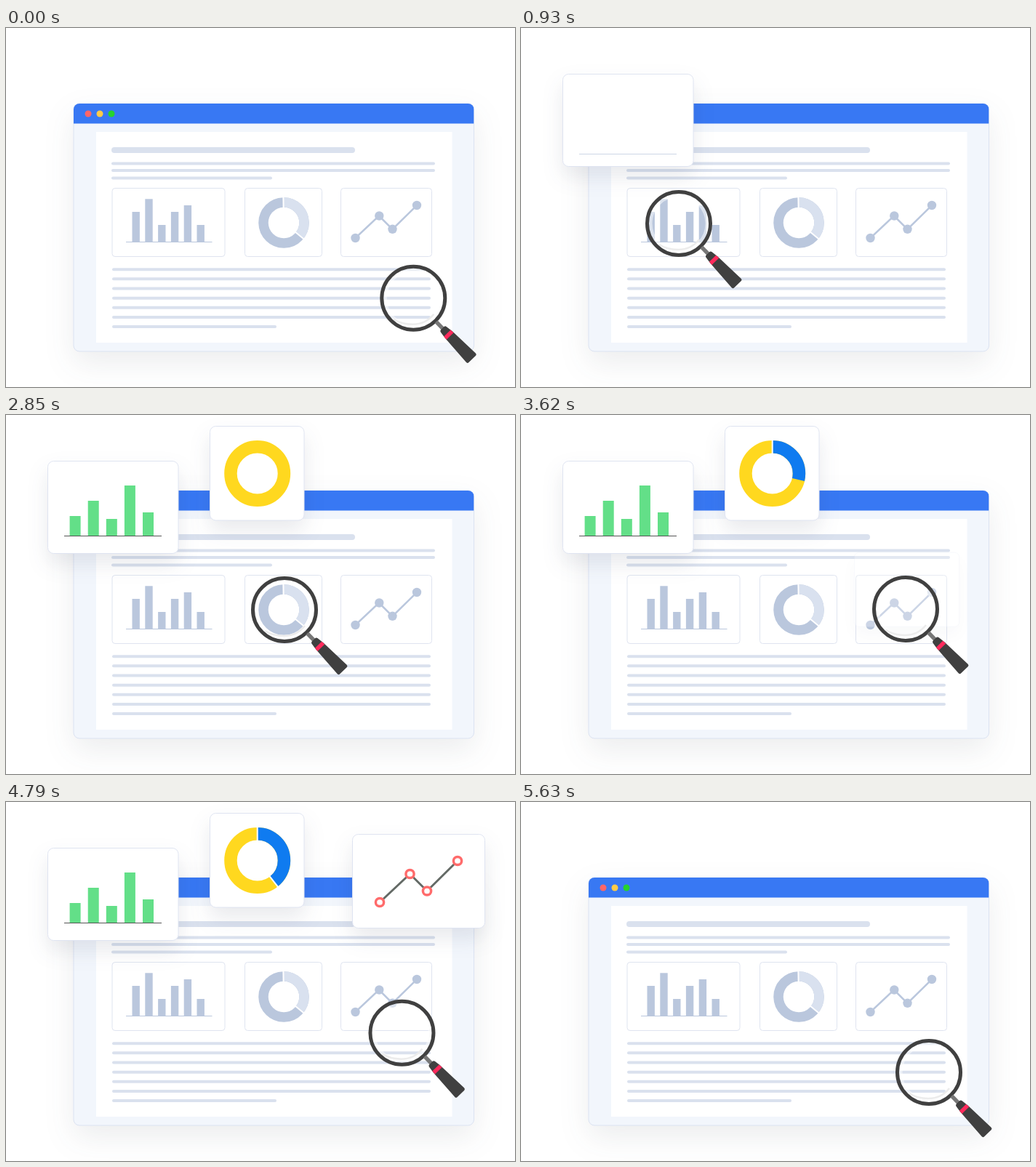
An HTML page that plays this animation: 700 by 494 pixels, repeating every 6.53 s.

```html
<!DOCTYPE html>
<html lang="en">
<head>
<meta charset="utf-8">
<title>Report analysis</title>
<style>
  html, body { margin: 0; width: 100%; height: 100%; overflow: hidden; background: #fff; }
  svg { display: block; width: 700px; height: 494px; }
  .window { filter: drop-shadow(0 16px 20px rgba(40, 50, 70, .09)); }
  .card > rect:first-child { fill: #fff; stroke: #dfe4f1; filter: drop-shadow(0 14px 14px rgba(40, 50, 80, .1)); }
  .panel { fill: #fff; stroke: #dfe4f0; }
  .text { stroke: #dae1ee; stroke-width: 4; stroke-linecap: round; }
</style>
</head>
<body>
<svg viewBox="0 0 700 494" fill="none">
  <defs><clipPath id="frame"><rect x="93" y="104" width="550.5" height="341" rx="8"/></clipPath></defs>

  <rect class="window" x="93" y="104" width="550.5" height="341" rx="8" fill="#f2f6fc"/>
  <rect x="93" y="104" width="550.5" height="341" rx="8" stroke="#dbe3f2"/>
  <path d="M93 103.5H643.5V131.5H93Z" fill="#3878f3" clip-path="url(#frame)"/>
  <circle cx="113" cy="118" r="4.5" fill="#ff6668"/>
  <circle cx="129" cy="118" r="4.5" fill="#ffcb47"/>
  <circle cx="145" cy="118" r="4.5" fill="#26d32c"/>
  <path d="M124 143H613.5V433H124Z" fill="#fff"/>
  <rect x="145" y="164" width="335" height="8" rx="4" fill="#dae1ee"/>
  <g id="lines" class="text"></g>

  <rect class="panel" x="146" y="220.5" width="155" height="94" rx="4"/>
  <rect class="panel" x="328.5" y="220.5" width="106" height="94" rx="4"/>
  <rect class="panel" x="460.5" y="220.5" width="125" height="94" rx="4"/>
  <g id="greyBars" fill="#bac7dd"></g>
  <path d="M165 294.5H283.5" stroke="#bac7dd"/>
  <g transform="translate(382 268) rotate(-91)" stroke-width="13.5">
    <circle r="28" stroke="#bac7dd"/>
    <circle r="28" stroke="#d9e1ef" pathLength="360" stroke-dasharray="130 360"/>
    <path d="M20 0H36" stroke="#fff" stroke-width="2"/>
    <path d="M20 0H36" stroke="#fff" stroke-width="2" transform="rotate(130)"/>
  </g>
  <path d="M480.5 289L513 258.5L531.5 277L565 244" stroke="#bac7dd" stroke-width="2.5"/>
  <g id="greyDots" fill="#bac7dd"></g>

  <g class="card">
    <rect x="57.5" y="63.5" width="179.5" height="127" rx="8"/>
    <g id="bars" fill="#63df88"></g>
    <path id="axis" d="M80 0H214"/>
  </g>
  <g class="card">
    <rect x="280.5" y="15.5" width="129.5" height="129.5" rx="8"/>
    <g transform="translate(345.7 80.5) rotate(-90)" stroke-width="17.5">
      <circle id="yellow" r="36.75" stroke="#ffd81f" pathLength="360"/>
      <circle id="blue" r="36.75" stroke="#0f7bf0" pathLength="360"/>
      <path id="gapTop" d="M27 0H47" stroke="#fff" stroke-width="2"/>
      <path id="gapEnd" d="M27 0H47" stroke="#fff" stroke-width="2" transform="rotate(142)"/>
    </g>
  </g>
  <g class="card">
    <rect x="476.5" y="44.5" width="182" height="129" rx="8"/>
    <path id="trend" d="M514 138L555.5 99L579 122.5L621 81" stroke="#646a66" stroke-width="3" pathLength="1"/>
    <g id="dots" fill="#fff" stroke="#ff6b6b" stroke-width="3.5"></g>
  </g>

  <g id="glass">
    <circle r="39" stroke="#fff" stroke-width="5" opacity=".5"/>
    <path d="M-27 29Q-16 36 -1 36Q17 36 28 22" stroke="#ececec" stroke-width="2.6"/>
    <circle r="43.5" stroke="#404040" stroke-width="5"/>
    <g transform="rotate(46)">
      <path d="M45 0H62" stroke="#777" stroke-width="5.5"/>
      <path d="M60 -3L69 -4.3L114 -6.5V6.5L69 4.3L60 3Z" fill="#404040" stroke="#404040" stroke-width="5" stroke-linejoin="round"/>
      <path d="M67 -6.4L72.5 -6.8V6.8L67 6.4Z" fill="#ff2a5c"/>
    </g>
  </g>
</svg>
<script>
  const $ = id => document.getElementById(id);
  const clamp = v => Math.min(1, Math.max(0, v));
  const ramp = (t, from, to) => clamp((t - from) / (to - from));
  const mix = (a, b, p) => a + (b - a) * p;

  const LOOP = 6530, BASE = 166;

  // Static document parts
  const textLine = (x1, x2, y) => `<path d="M${x1 + 2} ${y}H${x2 - 2}"/>`;
  let lines = textLine(145, 590, 186.5) + textLine(145, 590, 196) + textLine(145, 366, 206.5);
  for (let i = 0; i < 7; i++) lines += textLine(146, i < 6 ? 584 : 372, 332.2 + i * 13.15);
  $('lines').innerHTML = lines;

  $('greyBars').innerHTML = [253, 235.3, 271, 253, 244, 271].map((y, i) =>
    `<rect x="${173.5 + i * 17.8}" y="${y}" width="10.4" height="${294.5 - y}"/>`).join('');
  $('greyDots').innerHTML = [[480.5, 289], [513.3, 258.5], [531.5, 276.8], [565, 244]].map(([x, y]) =>
    `<circle cx="${x}" cy="${y}" r="6.2"/>`).join('');

  // Animated chart parts
  const heights = [27, 48, 23, 69, 32];
  $('bars').innerHTML = heights.map((h, i) => `<rect x="${87.6 + i * 25.1}" width="15"/>`).join('');
  const points = [[514, 138, 0], [555.5, 99, .38], [579, 122.5, .6], [621, 81, 1]];
  $('dots').innerHTML = '<circle r="5.6"/>'.repeat(points.length);

  // Each card flies from its small chart to its own place
  const cards = [
    { from: [262, 258], to: [147, 127], start: 480, end: 840 },
    { from: [381, 267], to: [345.2, 80.2], start: 1890, end: 2250 },
    { from: [523, 267], to: [567.5, 109], start: 3560, end: 3920 }
  ];
  const cardNodes = document.querySelectorAll('.card');

  // Magnifier stops: x, y, departure, arrival
  const stops = [
    [217, 269, 0, 480],
    [383, 268, 1500, 1980],
    [529, 267, 3140, 3620],
    [561, 372, 4540, 5060]
  ];

  function drawCards(t) {
    const back = ramp(t, 5330, 5630);
    cards.forEach(({ from, to, start, end }, i) => {
      const p = ramp(t, start, end) * (1 - back);
      const s = mix(.75, 1, p);
      const x = mix(from[0], to[0], p), y = mix(from[1], to[1], p);
      cardNodes[i].setAttribute('transform',
        `translate(${x} ${y}) scale(${s}) translate(${-to[0]} ${-to[1]})`);
      cardNodes[i].setAttribute('opacity', p ** .75);
    });
  }

  function drawBars(t) {
    const p = ramp(t, 1020, 1320);
    [...$('bars').children].forEach((bar, i) => {
      bar.setAttribute('y', BASE - heights[i] * p);
      bar.setAttribute('height', heights[i] * p);
    });
    $('axis').setAttribute('transform', `translate(0 ${mix(173.5, 166.5, p)})`);
    $('axis').setAttribute('stroke', `rgb(${mix(205, 85, p)},${mix(214, 85, p)},${mix(230, 85, p)})`);
  }

  function drawRing(t) {
    const blue = 142 * ramp(t, 3140, 3800);
    $('yellow').setAttribute('stroke-dasharray', `${360 * ramp(t, 2550, 2850)} 360`);
    $('blue').setAttribute('stroke-dasharray', `${blue} 360`);
    $('gapTop').setAttribute('opacity', +(blue > 0));
    $('gapEnd').setAttribute('opacity', +(blue >= 142));
  }

  function drawTrend(t) {
    const p = ramp(t, 4160, 4510);
    $('trend').setAttribute('stroke-dasharray', `${p} 2`);
    [...$('dots').children].forEach((dot, i) => {
      const [x, y, at] = points[i];
      dot.setAttribute('transform', `translate(${x} ${y}) scale(${clamp((p - .87 * at) * 8)})`);
    });
  }

  function drawGlass(t) {
    let x = 561, y = 372;
    for (const [nx, ny, start, end] of stops) {
      const p = ramp(t, start, end);
      x = mix(x, nx, p);
      y = mix(y, ny, p);
    }
    $('glass').setAttribute('transform', `translate(${x} ${y})`);
  }

  function draw() {
    const t = performance.now() % LOOP;
    drawCards(t);
    drawBars(t);
    drawRing(t);
    drawTrend(t);
    drawGlass(t);
    requestAnimationFrame(draw);
  }
  draw();
</script>
</body>
</html>
```
